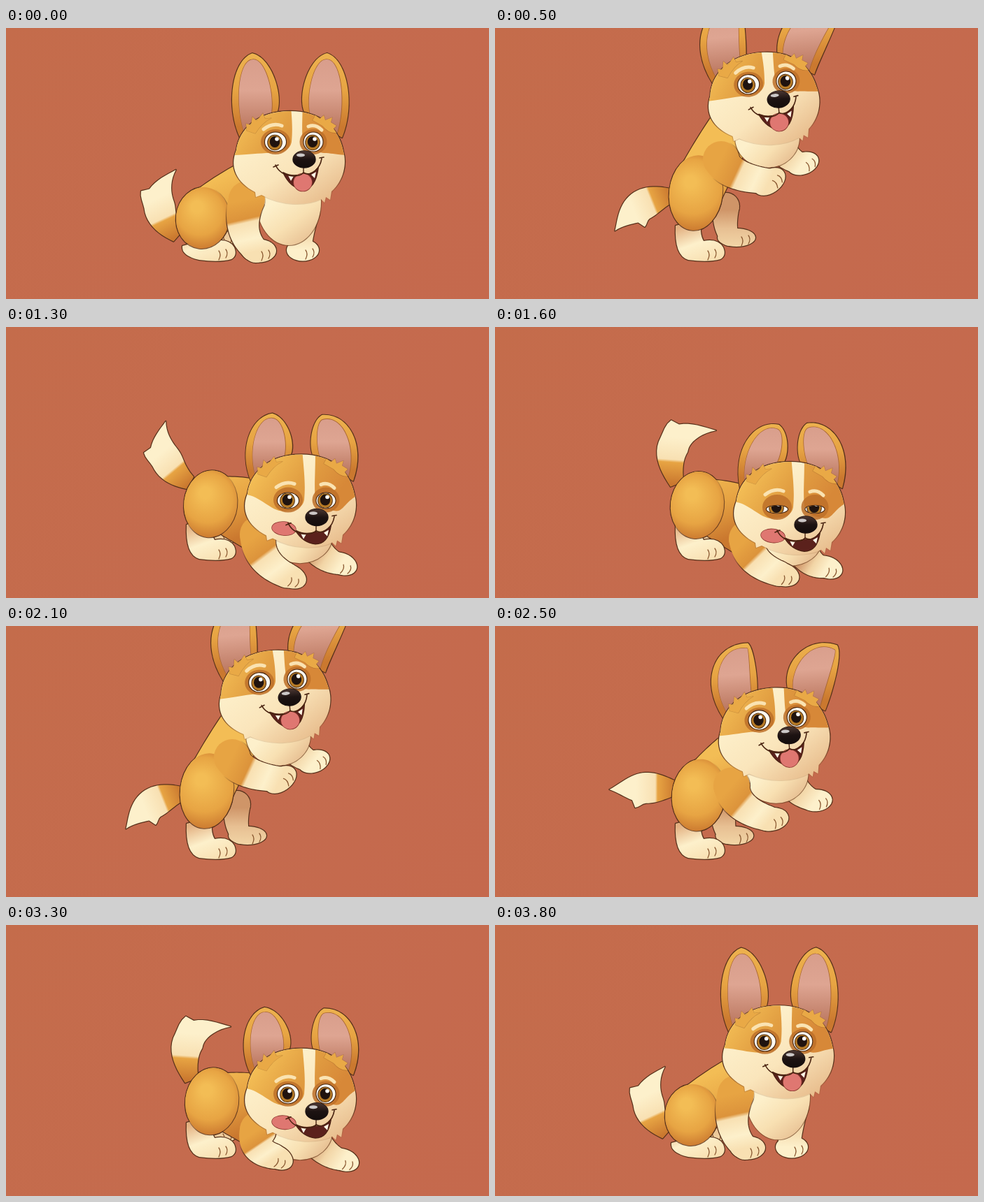
These frames come from a looping animation (690x388 px, 3.9 s). An HTML page with a canvas:

```html
<!DOCTYPE html>
<html lang="en">
<head>
<meta charset="utf-8">
<title>Playful corgi</title>
<style>
html, body { margin: 0; width: 100%; height: 100%; overflow: hidden; background: #c56b4e; }
canvas { display: block; width: 690px; height: 388px; }
</style>
</head>
<body>
<canvas id="stage" width="690" height="388"></canvas>
<script>
const ctx = document.getElementById('stage').getContext('2d');
const LOOP = 3900, STEP = 100;
const LINE = '#56301a', TAU = Math.PI * 2, DEG = Math.PI / 180;
const GOLD = ['#f3bd55', '#e7a443', '#ca782f'];
const CREAM = ['#fdf0cb', '#f8e0b2', '#e3b182'];
const SHADE = ['#f2d5a6', '#e7bf92', '#cf9568'];

const mix = (a, b, k) => a + (b - a) * k;
const bow = (a, c, b, u) => mix(mix(a, c, u), mix(c, b, u), u);
const clamp = v => Math.max(0, Math.min(1, v));
const ease = (t, a, b) => {
  const u = clamp((t - a) / (b - a));
  return u * u * (3 - 2 * u);
};
// Eases in from a to b, holds, eases out from c to d.
const pulse = (t, a, b, c, d) => ease(t, a, b) * (1 - ease(t, c, d));

// The dog sits; every other pose is that one plus weighted movements.
function poseAt(t) {
  const rear = pulse(t, 0, 330, 500, 680) + pulse(t, 1600, 1950, 2330, 2720);
  const lunge = pulse(t, 500, 680, 1600, 1950) + pulse(t, 2330, 2720, 3380, 3740);
  const flop = pulse(t, 100, 400, 500, 700) + pulse(t, 1650, 2000, 2430, 2730);
  const look = pulse(t, 500, 680, 1600, 1950) + pulse(t, 2480, 2720, 3650, 3900);
  const dip = pulse(t, 1050, 1500, 1620, 1850) + 0.35 * pulse(t, 3000, 3300, 3400, 3700);
  const lift = pulse(t, 3050, 3300, 3350, 3700);
  const stretch = pulse(t, 3550, 3700, 3700, 3850);
  const squint = clamp((dip - 0.4) / 0.6);
  const wag = Math.cos((t - 1600) / 850 * TAU);
  const stand = rear + lunge;

  const head = {
    x: 404 - 21 * rear + 16 * lunge,
    y: 185 - 84 * rear + 49 * lunge + 25 * dip - 14 * stretch,
    tilt: -5 * flop * DEG, look, squint,
    tongue: ease(lunge, 0.5, 1)
  };
  const paw = {
    x: 361 + 31 * rear + 37 * lunge + 12 * dip - 16 * lift,
    y: 319 - 99 * rear + 41 * lunge - 6 * dip - 26 * lift,
    tilt: (-35 * rear + 32 * lunge - 15 * dip) * DEG
  };
  const farPaw = {
    x: 424 + 16 * rear + 62 * lunge - 12 * dip,
    y: 318 - 124 * rear + 14 * lunge + 12 * dip,
    tilt: 20 * (lunge - rear) * DEG
  };
  const hip = {
    x: 281 + 6 * rear + 16 * lunge - 8 * dip,
    y: 272 - 36 * rear - 21 * lunge + 4 * dip,
    rx: 38, ry: 44 + 10 * rear + 4 * lunge,
    heelX: 252 + 6 * stand, heelY: 312 - 29 * stand
  };
  const long = 106 - 8 * rear - 24 * lunge;
  return {
    head, paw, farPaw, hip, stand,
    shoulder: { x: head.x - 60, y: head.y + 60 + 27 * rear - 6 * lunge - 10 * dip },
    neck: { x: head.x - 35 - 17 * lunge, y: head.y + 28 - 22 * lunge },
    chest: { x: head.x + 6 * rear, y: head.y + 64 - 8 * stand - 8 * dip, ry: 62 - 19 * stand - 8 * dip },
    ears: [
      { x: -45, side: -1, long, angle: -4 + 18 * flop + 26 * squint, bend: -22 * flop - 6 * squint },
      { x: 51, side: 1, long, angle: 2 + 42 * flop - 14 * lunge - 6 * squint, bend: -23 * flop + 8 * lunge }
    ],
    tail: {
      x: hip.x - 35 + 6 * lunge, y: hip.y + 26 - 22 * rear - 56 * lunge,
      angle: -2 - 120 * flop + lunge * (2 + 36 * wag)
    }
  };
}

function grad(x0, y0, x1, y1, stops) {
  const g = ctx.createLinearGradient(x0, y0, x1, y1);
  stops.forEach((s, i) => Array.isArray(s)
    ? g.addColorStop(s[0], s[1]) : g.addColorStop(i / (stops.length - 1), s));
  return g;
}

// Outline all paths first so that their fills join into one silhouette.
function shape(paths, fill, line = LINE, width = 2.4) {
  ctx.strokeStyle = line;
  ctx.lineWidth = width;
  paths.forEach(p => ctx.stroke(p));
  ctx.fillStyle = fill;
  paths.forEach(p => ctx.fill(p));
}

function oval(x, y, rx, ry, rot = 0) {
  const p = new Path2D();
  p.ellipse(x, y, rx, ry, rot, 0, TAU);
  return p;
}

function dot(x, y, rx, ry, fill) {
  ctx.fillStyle = fill;
  ctx.fill(oval(x, y, rx, ry));
}

function draw(d, color, width) {
  ctx.strokeStyle = color;
  ctx.lineWidth = width;
  ctx.stroke(new Path2D(d));
}

// Tapered strip along a quadratic curve.
function strip(a, c, b, left, right = left) {
  const n = 24, sides = [[], []];
  for (let i = 0; i <= n; i++) {
    const u = i / n;
    const x = bow(a.x, c.x, b.x, u), y = bow(a.y, c.y, b.y, u);
    const dx = mix(c.x - a.x, b.x - c.x, u), dy = mix(c.y - a.y, b.y - c.y, u);
    const len = Math.hypot(dx, dy) || 1;
    const nx = dy / len, ny = -dx / len;
    sides[0].push([x + nx * left(u), y + ny * left(u)]);
    sides[1].unshift([x - nx * right(u), y - ny * right(u)]);
  }
  const p = new Path2D();
  sides.flat().forEach(([x, y]) => p.lineTo(x, y));
  p.closePath();
  return p;
}

// Limb with round ends; its middle is pushed by (dx, dy).
function limb(a, b, dx, dy, w0, w1) {
  const c = { x: (a.x + b.x) / 2 + dx, y: (a.y + b.y) / 2 + dy };
  return [strip(a, c, b, u => mix(w0, w1, u)), oval(a.x, a.y, w0, w0), oval(b.x, b.y, w1, w1)];
}

function toes(x, y, rot = 0) {
  ctx.save();
  ctx.translate(x, y);
  ctx.rotate(rot);
  draw('M4 2Q8 7 4 15M14 0Q18 5 14 12', '#8a5932', 1.3);
  ctx.restore();
}

function drawTail({ x, y, angle }) {
  const dx = Math.sin(angle * DEG), dy = -Math.cos(angle * DEG);
  const curl = 52 + 0.6 * angle;
  const base = { x, y }, tip = { x: x + 95 * dx, y: y + 95 * dy };
  const mid = { x: x + 47 * dx + curl * dy, y: y + 47 * dy - curl * dx };
  const w = u => (10 + 13 * Math.sin(Math.PI * u)) * (1 - u ** 4);
  const tuft = u => w(u) + (u < 0.66 ? 10 * ease(u, 0.45, 0.66) : 0);
  const fill = grad(x, y, bow(x, mid.x, tip.x, 0.6), bow(y, mid.y, tip.y, 0.6),
    [[0, GOLD[2]], [0.46, GOLD[1]], [0.52, CREAM[1]], [1, CREAM[0]]]);
  shape([strip(base, mid, tip, tuft, w)], fill);
}

function drawFarLegs({ head, farPaw, stand, paw }) {
  const out = clamp((300 - paw.y) / 25);
  const x = 303 + 42 * out;
  shape([...limb({ x: x - 15, y: 255 }, { x: x - 10, y: 298 }, -6, 8, 19, 14), oval(x, 300, 27, 13)],
    grad(0, 260, 0, 313, [SHADE[2], SHADE[1], SHADE[0]]));
  toes(x + 3, 297);

  const top = { x: head.x + 22, y: head.y + 78 - 12 * stand };
  const { x: px, y: py, tilt } = farPaw;
  shape([...limb(top, { x: px - 3, y: py }, -3, 8 * stand, 22, 15), oval(px, py, 23, 15.5, tilt)],
    grad(top.x, top.y, px, py, [SHADE[2], SHADE[0], CREAM[0]]));
  toes(px, py - 2, tilt);
}

function drawBody({ hip, neck, shoulder, chest }) {
  const { x, y, rx, ry, heelX, heelY } = hip;
  const haunch = oval(x, y, rx, ry, 0.12);
  const torso = [...limb(hip, neck, 0, -8, 37, 33), ...limb(hip, shoulder, 0, 0, 30, 27)];
  shape([...torso, haunch], grad(x - 5, y - 45, x + 35, y + 50, GOLD));
  shape([oval(chest.x, chest.y, 46, chest.ry)],
    grad(chest.x - 20, chest.y, chest.x + 25, chest.y + chest.ry, [CREAM[0], CREAM[1], SHADE[1]]),
    'rgba(110,64,34,.7)', 2);

  const foot = new Path2D(`M${heelX} ${heelY}Q${heelX - 2} 326 276 332Q305 336 322 331Q331 326 326 314` +
    `Q318 301 298 305Q291 293 ${heelX + 38} ${heelY - 10}Z`);
  shape([foot], grad(280, 280, 300, 335, [CREAM[2], CREAM[0], CREAM[1]]));
  toes(300, 317);

  const fill = ctx.createRadialGradient(x - 8, y - 16, 8, x - 2, y - 4, ry + 6);
  GOLD.forEach((c, i) => fill.addColorStop([0, 0.6, 1][i], c));
  shape([haunch], fill, grad(x - rx * 0.2, y - ry * 0.5, x + rx * 0.6, y + ry * 0.3,
    ['rgba(86,48,26,0)', 'rgba(86,48,26,.85)']), 2);
}

function drawArm({ shoulder, paw }) {
  const { x: sx, y: sy } = shoulder, { x: px, y: py, tilt } = paw;
  const fill = grad(sx, sy, px, py,
    [[0, GOLD[1]], [0.36, '#dc933b'], [0.43, CREAM[1]], [0.75, CREAM[0]], [1, CREAM[1]]]);
  const line = grad(sx, sy, px, py, [[0, 'rgba(86,48,26,0)'], [0.4, LINE], [1, LINE]]);
  shape([...limb(shoulder, { x: px - 4, y: py - 1 }, -22, 10, 26, 18), oval(px, py, 25, 16.5, tilt)], fill, line);
  toes(px, py - 1, tilt);
}

// A leaf around a bent spine; k scales it for the pink inside.
function earPath({ x, side, long, angle, bend }, k) {
  const y = -43, nx = Math.cos(angle * DEG), ny = Math.sin(angle * DEG);
  const at = (out, along) => [x + nx * out + ny * along, y + ny * out - nx * along];
  const w = 43 * k, hx = 25 * k, hy = 15 * side * k;
  const tip = at(0, long * (0.72 + 0.28 * k));
  const p = new Path2D();
  p.moveTo(x - hx, y - hy);
  p.bezierCurveTo(...at(bend - w, long * 0.3), ...at(bend - w * 0.7, long * 0.92), ...tip);
  p.bezierCurveTo(...at(bend + w * 0.7, long * 0.92), ...at(bend + w, long * 0.3), x + hx, y + hy);
  p.closePath();
  return p;
}

function drawEar(ear) {
  const top = -43 - ear.long;
  shape([earPath(ear, 1)], grad(0, -43, 0, top, [GOLD[2], GOLD[1], '#edb24f']));
  shape([earPath(ear, 0.7)], grad(0, -43, 0, top, ['#bd7a63', '#dea592', '#d79c8a']), '#a96632', 1.6);
}

function drawEye(x, y, rx, squint) {
  const open = 1 - 0.62 * squint;
  dot(x, y, rx + 6, 18, 'rgba(190,112,42,.85)');
  ctx.save();
  const lid = oval(x, y + 3 * squint, rx, 13.5 * open);
  shape([lid], '#fffaf0', '#43230f', 2.2);
  ctx.clip(lid);
  const ix = x - 1, iy = y + 1;
  shape([oval(ix, iy, 10, 10.5)], '#b67a26', '#3a1f10', 1.6);
  dot(ix, iy - 1, 7.2, 8, '#20130f');
  dot(ix + 3, iy - 5, 2.8, 2.8, '#fff');
  ctx.restore();
}

function drawMouth(side) {
  const deep = 46 - 5 * side;
  const mouth = new Path2D(`M-8 22Q5 29 20 24Q32 27 42 15Q38 ${deep} 20 ${deep}Q2 ${deep - 2} -8 22Z`);
  shape([mouth], '#5b211c', '#44200f', 1.8);
  const x = mix(20, -25, side), y = mix(36, 19, side);
  shape([oval(x, y, 13 + 4 * side, 12.5 - 3 * side, 0.1 * side)], '#df7771', '#8c3a31', 1.6);
  ctx.fillStyle = '#fff8e6';
  ctx.fill(new Path2D('M-1 26L7 27L3 34ZM32 25L39 21L37 30Z'));
  draw('M-19 11Q-13 25 5 27Q17 27 21 22Q28 27 38 19Q45 13 47 2M-22 14L-15 11M44 1L50 0', '#4a2411', 1.6);
  draw('M21 14L21 23', '#4a2411', 1.4);
}

function drawHead({ head, ears }) {
  const { x, y, tilt, look, squint, tongue } = head;
  const fall = 21 * look;
  const side = -3 - 1.3 * fall;
  ctx.save();
  ctx.translate(x, y);
  ctx.rotate(tilt);
  ears.forEach(drawEar);

  const skull = new Path2D('M2 -66C-45 -66 -71 -40 -75 -10C-85 14 -75 36 -48 50L-47 57L-39 54' +
    'C-10 70 25 70 46 60L51 65L53 57L59 61L61 49C79 33 83 9 78 -8C72 -42 45 -66 2 -66Z');
  shape([skull], grad(-35, -40, 40, 72, [CREAM[0], '#fae5bb', '#e8bd8d']),
    grad(0, 20, 0, 60, [LINE, 'rgba(150,95,52,.2)']));

  ctx.save();
  ctx.clip(skull);
  ctx.translate(2 * look, fall);
  ctx.fillStyle = grad(-60, -65, 30, 0, [GOLD[0], '#e29f42', '#d78838']);
  ctx.fill(new Path2D(`M1 -95C4 -60 6 -45 4 -22C1 -6 -16 -7 -26 -6C-45 -6 -60 ${side} -85 ${side}L-95 -95Z` +
    `M20 -95C20 -60 18 -40 20 -24C24 -8 40 -8 50 -6C62 -6 68 ${side} 92 ${side}L95 -95Z`));
  drawEye(-19, -22, 15, squint);
  drawEye(35, -22, 13.5, squint);
  draw('M-36 -40Q-23 -50 -10 -45M28 -44Q38 -48 47 -39', '#fae3b2', 5);
  ctx.restore();

  shape([new Path2D('M-60 -38L-61 -48L-54 -46L-52 -58L-46 -52L-37 -63L-34 -55L-25 -56Q-38 -50 -48 -34Z' +
    'M34 -53L38 -60L44 -55L50 -60L52 -53L62 -57L60 -50L68 -45L64 -41L68 -35Q57 -34 48 -45Z')],
    '#e9a946', 'rgba(130,75,30,.35)', 1.2);

  ctx.translate(2 * look, fall);
  drawMouth(tongue);
  shape([oval(22, 3, 16, 12)], grad(0, -9, 0, 15, ['#4c3833', '#1d1312', '#140d0c']), '#1d1210', 1.4);
  dot(17, -3, 6, 2.4, 'rgba(255,255,255,.75)');
  ctx.restore();
}

function render(t) {
  ctx.fillStyle = grad(0, 0, 690, 388, ['#c46c4b', '#c56b4e', '#c5694d']);
  ctx.fillRect(0, 0, 690, 388);
  ctx.lineJoin = ctx.lineCap = 'round';
  const pose = poseAt(t);
  drawTail(pose.tail);
  drawFarLegs(pose);
  drawBody(pose);
  drawArm(pose);
  drawHead(pose);
}

const start = performance.now();
function tick() {
  const t = (performance.now() - start) % LOOP;
  render(Math.floor(t / STEP) * STEP);
  requestAnimationFrame(tick);
}
tick();
</script>
</body>
</html>
```
